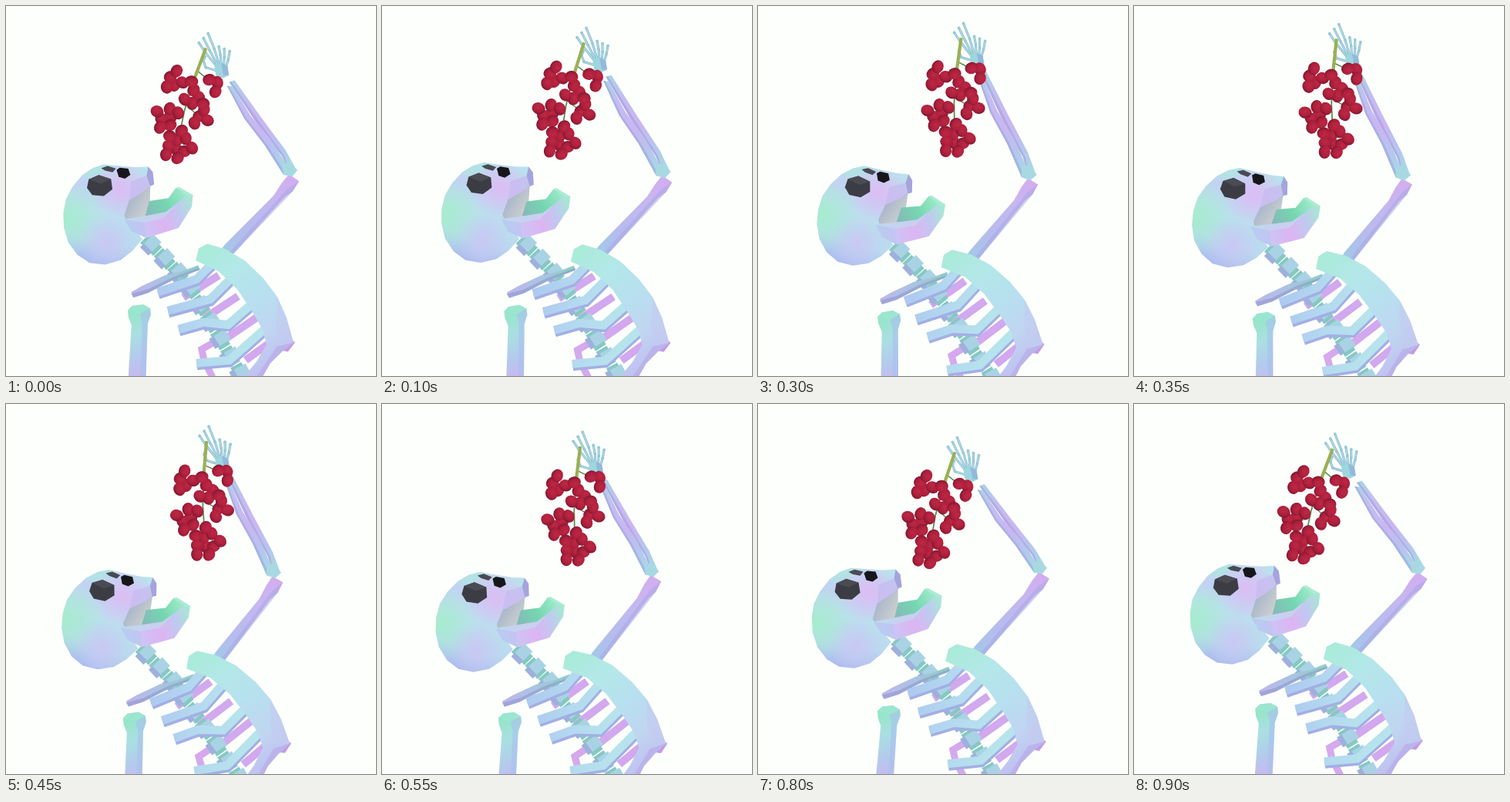
Write an HTML page that moves like this. It is 480x480 px and loops after 0.95 s.

```html
<!DOCTYPE html>
<html lang="en">
<head>
<meta charset="utf-8">
<title>Skeleton with grapes</title>
<style>
html, body { margin: 0; width: 100%; height: 100%; overflow: hidden; background: #fdfffc; }
svg { display: block; width: 100vw; height: 100vh; }
</style>
</head>
<body>
<svg id="stage" viewBox="0 0 480 480"></svg>
<script>
const LOOP = 950, STEP = 50, TAU = 2 * Math.PI;

// One sway per loop: middle value, amplitude, time of the peak in ms
const wave = (mid, amp, peak) => t => mid + amp * Math.cos(TAU * (t - peak) / LOOP);
const still = () => 0;

const hand = { x: wave(.3, 4.6, 240), y: wave(-2.7, 11, 745) };
const sways = {
  skull: { pivot: [125, 272], x: wave(-1.8, 5, 200), y: wave(6.3, 7.8, 610), turn: wave(4.2, 4.6, 355) },
  jaw: { pivot: [180, 275], x: wave(-2.2, 3.7, 120), y: wave(7.3, 7.5, 515), turn: wave(-.6, 2.4, 300) },
  neck: { pivot: [205, 330], x: wave(-3, 3.3, 20), y: wave(6.5, 7.5, 505), turn: still },
  torso: { pivot: [280, 390], x: wave(-4, 4, 5), y: wave(4.7, 5.3, 490), turn: wave(-1.9, 2, 0) },
  arm: { pivot: [173, 395], x: wave(-3.3, 3.7, 75), y: wave(5.5, 6.5, 500), turn: wave(.3, 2.3, 725) },
  hand: { pivot: [278, 85], ...hand, turn: still },
  bunch: { pivot: [259, 55], ...hand, turn: wave(8.5, 8, 910) }
};
sways.back = sways.torso;

const elbow = [wave(361.5, 11, 915), wave(219.5, 3, 370)];
const wrist = [wave(289.7, 2.6, 120), wave(96.5, 10.5, 740)];
const shoulder = [wave(280.5, 5.5, 920), wave(324.5, 6, 505)];
// Long bones: end points as drawn, and the joints they follow
const bones = {
  upper: { from: [371, 218], to: [285, 320], joints: [elbow, shoulder] },
  fore: { from: [292, 98], to: [371, 218], joints: [wrist, elbow] }
};

const lin = (id, x1, y1, x2, y2, ...colors) =>
  `<linearGradient id="${id}" gradientUnits="userSpaceOnUse" x1="${x1}" y1="${y1}" x2="${x2}" y2="${y2}">` +
  colors.map((c, i) => `<stop offset="${i / (colors.length - 1)}" stop-color="${c}"/>`).join('') + '</linearGradient>';
const glow = (id, color, x, y, r) =>
  `<radialGradient id="${id}" gradientUnits="userSpaceOnUse" cx="${x}" cy="${y}" r="${r}">` +
  `<stop offset="0" stop-color="${color}"/><stop offset="1" stop-color="${color}" stop-opacity="0"/></radialGradient>`;
const poly = (points, fill, opacity = 1) => `<polygon points="${points}" fill="${fill}" opacity="${opacity}"/>`;
const line = (points, color, w) =>
  `<polyline points="${points}" fill="none" stroke="${color}" stroke-width="${w}"/>`;
const group = (id, ...body) => `<g id="${id}">${body.join('')}</g>`;
const repeat = (n, make) => Array.from({ length: n }, (_, i) => make(i)).join('');

const defs = '<defs>' +
  lin('gSkull', 145, 205, 115, 335, '#b8e4ec', '#c2d2f3', '#bcdfee', '#b9daee', '#abb9ef') +
  glow('gMint', '#a6ecce', 80, 275, 50) +
  glow('gPink', '#dcbdf4', 150, 235, 40) +
  glow('gLilac', '#c9c8f4', 132, 305, 36) +
  lin('gGray', 160, 250, 188, 265, '#aab7ca', '#d0d3d0') +
  lin('gJaw', 155, 285, 243, 250, '#b6d8ef', '#cfc2f4', '#dcb5f2', '#c0c9f0', '#a5ebd0') +
  lin('gMouth', 185, 270, 230, 245, '#83bcb9', '#75d6b0', '#9ae8c8') +
  lin('gUpper', 370, 225, 285, 322, '#d2aef0', '#c4b8f0', '#b8bbee', '#a3c8e8') +
  lin('gFore', 290, 98, 372, 218, '#a9d4e6', '#c4bdf0', '#cab6f1', '#b6c6ee', '#a2dfe0') +
  lin('gPlate', 252, 312, 355, 470, '#a8ebd6', '#b3e8e8', '#b7e0ef', '#c0d5f1', '#bfbcf0') +
  lin('gRib', 200, 390, 315, 400, '#aecaf0', '#b4daef', '#b7e4ec') +
  lin('gArm', 158, 400, 185, 480, '#95e6c8', '#aadfe2', '#b3cbed', '#c9b7ef') +
  lin('gClav', 163, 375, 250, 340, '#bfb6ec', '#a9c4e2', '#8bcfc4') +
  '<radialGradient id="gGrape" cx=".45" cy=".36" r=".64"><stop offset="0" stop-color="#be2845"/>' +
  '<stop offset=".6" stop-color="#ae203c"/><stop offset="1" stop-color="#7f1830"/></radialGradient></defs>';

const vertebra = (x, y, angle) =>
  `<g transform="translate(${x} ${y}) rotate(${angle})">` +
  '<rect x="-12" y="-8" width="24" height="16" fill="#86c8c2"/>' +
  '<rect x="-8" y="-12" width="15" height="24" fill="#a9d3e4"/>' +
  '<rect x="-8" y="5" width="15" height="7" fill="#9fb0dc"/></g>';

const rib = p => `<g transform="translate(1 4)">${line(p, '#a3afe4', 10)}</g>` + line(p, 'url(#gRib)', 11);

const finger = (...joints) =>
  `<g stroke-linecap="round" stroke-linejoin="round">${line(joints, '#8aa9cc', 3)}${line(joints, '#a5dfe0', 1.8)}</g>` +
  joints.slice(1).map(([x, y]) => `<circle cx="${x}" cy="${y}" r="1.9" fill="#96cbd8"/>`).join('');

// Clusters around the hanging stem: offset from its top and number of grapes
const clusters = [[-24, 99, 7], [1, 132, 10], [20, 90, 4], [5, 66, 5], [-27, 53, 5], [-1, 47, 1], [25, 43, 3]];
const STEM = 256;

// Grapes of a cluster sit on a sunflower spiral
const cluster = ([cx, cy, n], c) => repeat(n, k => {
  const r = 6.6 * Math.sqrt(k + .5), a = k * 2.4 + c * 1.9;
  const x = 259 + cx + r * Math.cos(a), y = 55 + cy + r * Math.sin(a);
  return `<ellipse rx="8.6" ry="7.6" fill="url(#gGrape)" transform="translate(${x} ${y}) rotate(${(c * 70 + k * 47) % 180})"/>`;
});

const skullShape = '75,268 78,250 86,234 98,219 112,209 126,204 150,206 168,207 184,206 190,213 192,229 187,231 184,245 168,270 158,277 178,300 165,316 150,328 130,334 110,332 94,322 82,306 76,287';

const parts = [
  group('upper',
    poly('357,230 366,219 379,228 371,241 360,249 294,323 273,324 283,311 346,247', 'url(#gUpper)'),
    poly('379,228 371,241 294,323 287,323 364,238', '#a9a8e6', .55)),
  group('fore',
    poly('290,98 297,96 331,145 362,188 376,214 369,220 357,195 323,149', 'url(#gFore)'),
    poly('290,98 293,98 328,150 360,195 369,220 357,195 323,149', '#a59fe0', .6),
    poly('287,103 294,104 317,142 343,174 367,213 359,220 335,181 309,146', 'url(#gFore)'),
    poly('287,103 290,104 312,146 338,180 361,217 359,220 335,181 309,146', '#9aa8e0', .6),
    poly('357,207 366,203 377,214 370,222 359,220', '#a8d9e3')),
  group('hand',
    repeat(3, k => finger([273 + 2 * k, 79], [258 + 6 * k, 60 - 2 * k], [250 + 6 * k, 48 - 6 * k])),
    repeat(3, k => finger([279 + 3 * k, 80], [278 + 5 * k, 64 + 3 * k], [276 + 7 * k, 53 + 3 * k])),
    finger([272, 84], [259, 80], [256, 72], [258, 66]),
    poly('270,77 279,74 287,78 289,90 281,94 272,90', '#9ed6de'),
    poly('279,74 287,78 289,90 282,90', '#93b9dc')),
  group('back',
    repeat(4, i => line([230 + 27 * i, 379 + 27 * i, 276 + 25 * i, 350 + 27 * i], '#d2a8ee', 10)),
    line('268,438 254,446 257,460 268,482', '#d6a8ee', 9),
    poly('362,425 375,437 366,449 350,446', '#c59ae6'),
    repeat(6, i => vertebra(239 + 13 * i, 367 + 22 * i, 52 + 2 * i))),
  group('neck',
    repeat(3, i => vertebra(188 + 17.5 * i, 311 + 18 * i, 45 + 2 * i)),
    poly('162,372 176,364 206,350 228,345 249,337 251,343 215,357 184,373 165,379', 'url(#gClav)'),
    poly('162,374 184,368 215,353 251,340 251,343 215,357 184,373 165,379', '#9098cc', .6)),
  group('torso',
    ['197,372 247,355 268,334', '210,396 265,381 294,352', '224,420 256,411 288,414 320,386', '247,464 290,460 335,420'].map(rib).join(''),
    poly('250,315 261,309 285,316 310,331 334,354 352,378 364,405 373,437 358,449 343,464 328,490 302,490 325,462 338,440 333,420 320,398 300,368 276,345 246,331', 'url(#gPlate)'),
    poly('352,378 364,405 373,437 358,449 350,420', '#c3cbf0', .6),
    poly('373,437 358,449 343,464 328,490 320,490 338,462 352,442', '#b9aeea', .75)),
  group('arm',
    poly('158,396 164,390 178,388 187,393 188,401 184,413 181,530 157,530 163,415 159,405', 'url(#gArm)'),
    poly('187,393 188,401 184,413 181,530 174,530 177,412 174,400', '#a9c2ee', .65),
    poly('158,396 164,390 178,388 187,393 174,400', '#9ce6d2', .8)),
  group('skull',
    poly(skullShape, 'url(#gSkull)'),
    ['gMint', 'gPink', 'gLilac'].map(g => poly(skullShape, `url(#${g})`)).join(''),
    poly('154,270 160,250 180,237 187,229 187,262 180,280 172,291 157,277', 'url(#gGray)'),
    poly('162,226 181,218 188,231 176,240 160,249', '#c8b9f0', .7),
    poly('184,206 190,213 192,229 187,231 182,218', '#a5a4dc'),
    poly('98,219 112,209 126,204 138,206 124,215 108,222', '#aee6e0', .6),
    poly('123,209 131,206 142,209 138,214 128,212', '#4a4a55'),
    poly('107,224 120,218 136,223 138,236 127,245 112,244 105,235', '#3c3c44'),
    poly('107,224 120,218 136,223 123,229', '#4b4b53'),
    poly('143,211 147,208 158,209 161,217 154,222 146,220', '#17171b')),
  group('jaw',
    poly('180,273 186,253 211,250 221,237 243,247 217,270 187,278', 'url(#gMouth)'),
    poly('153,276 182,272 207,268 222,257 236,245 243,247 241,262 223,289 181,301 162,292', 'url(#gJaw)'),
    poly('153,276 182,272 207,268 222,257 204,276 178,281', '#bfe0ee', .6),
    poly('153,276 178,281 181,301 162,292', '#b8c4f0', .5),
    poly('221,237 225,236 243,247 236,248', '#a9ecd3')),
  group('bunch',
    line([259, 55, STEM, 95, STEM - 1, 140, 259, 190], '#5e8a52', 1.8),
    clusters.map(([x, y]) => line([STEM, 43 + y, 259 + x, 55 + y], '#5e8a52', 1.5)).join(''),
    line([259, 55, STEM, 95], '#9bb054', 4.2),
    clusters.map(cluster).join(''))
];

const stage = document.getElementById('stage');
stage.innerHTML = defs + '<rect width="480" height="480" fill="#fdfffc"/>' + parts.join('');
const place = (id, transform) => document.getElementById(id).setAttribute('transform', transform);

// Turn and scale a bone so that its ends meet the joints
function poseBone(id, t) {
  const { from: [ax, ay], to: [bx, by], joints } = bones[id];
  const [[cx, cy], [dx, dy]] = joints.map(j => j.map(f => f(t)));
  const ux = bx - ax, uy = by - ay, vx = dx - cx, vy = dy - cy;
  const scale = Math.hypot(vx, vy) / Math.hypot(ux, uy);
  const angle = (Math.atan2(vy, vx) - Math.atan2(uy, ux)) * 360 / TAU;
  place(id, `translate(${cx} ${cy}) rotate(${angle}) scale(${scale}) translate(${-ax} ${-ay})`);
}

function draw(t) {
  for (const [id, { pivot, x, y, turn }] of Object.entries(sways))
    place(id, `translate(${x(t)} ${y(t)}) rotate(${turn(t)} ${pivot})`);
  for (const id in bones) poseBone(id, t);
}

function tick() {
  draw(Math.floor(performance.now() % LOOP / STEP) * STEP);
  requestAnimationFrame(tick);
}
tick();
</script>
</body>
</html>
```
